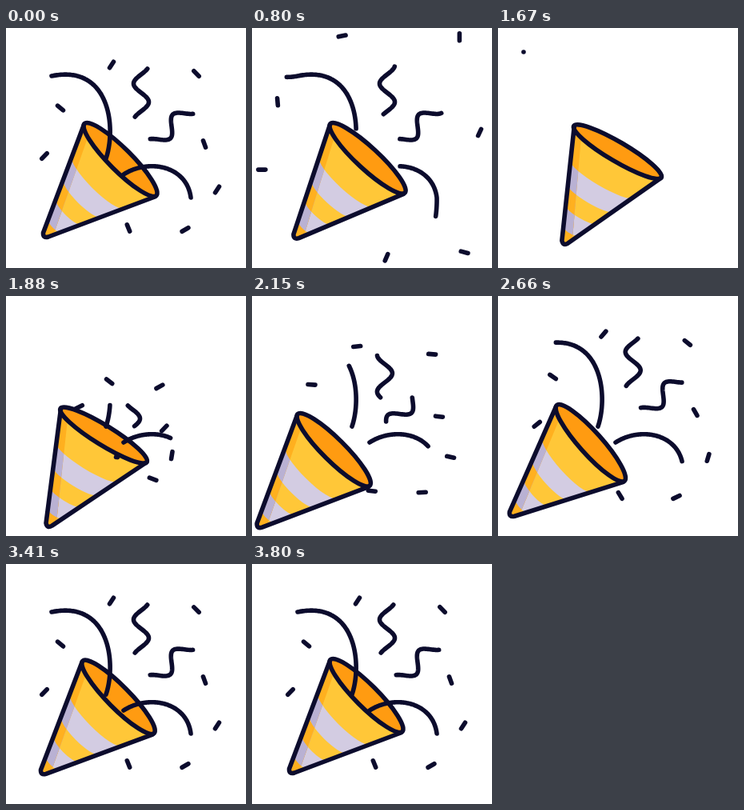
An HTML page with a canvas that plays this animation: 300x300 px, repeating every 3.83 s.

```html
<!DOCTYPE html>
<html lang="en">
<head>
<meta charset="utf-8">
<title>Party popper</title>
<style>
html, body { margin: 0; width: 100%; height: 100%; overflow: hidden; background: #fff; }
canvas { display: block; width: 100vmin; height: 100vmin; }
</style>
</head>
<body>
<canvas id="stage" width="300" height="300"></canvas>
<script>
const ctx = document.getElementById('stage').getContext('2d');
const LOOP = 3830, HOLD = 530, STEP = 30, FIRE = 1690;
const INK = '#0c0c2d', INSIDE = '#ff9b11';
const LIGHT = ['#ffc738', '#d3cce2'];
const SHADE = ['#ffb01f', '#b9b1d3'];

const clamp = (v, a = 0, b = 1) => Math.min(b, Math.max(a, v));
const span = (t, a, b) => clamp((t - a) / (b - a));
const smooth = p => p * p * (3 - 2 * p);
const rad = deg => deg * Math.PI / 180;
const bezier = (a, b, c, d, t) => {
  const n = 1 - t;
  return n * n * n * a + 3 * n * n * t * b + 3 * n * t * t * c + t * t * t * d;
};

// Quick start, long soft stop: cubic-bezier(.275, 0, .397, 1)
function settle(p) {
  let lo = 0, hi = 1;
  for (let i = 0; i < 20; i++) {
    const m = (lo + hi) / 2;
    if (bezier(0, 0.275, 0.397, 1, m) < p) lo = m; else hi = m;
  }
  return smooth(lo);
}

// Samples a curve by length; tail and head are where its visible part rests
function ribbon(curve, tail, head) {
  const N = 260, pts = [], len = [0];
  for (let i = 0; i <= N; i++) {
    pts.push(curve(i / N));
    if (i) len.push(len[i - 1] + Math.hypot(pts[i][0] - pts[i - 1][0], pts[i][1] - pts[i - 1][1]));
  }
  return { pts, len, total: len[N], tail: len[Math.round(tail * N)], head: len[Math.round(head * N)] };
}

// Two joined cubics: the first is seen at rest, the second leads away
function streamer(...p) {
  return ribbon(u => {
    const k = u < 0.5 ? 0 : 3, t = u < 0.5 ? u * 2 : u * 2 - 1;
    return [0, 1].map(c => bezier(p[k][c], p[k + 1][c], p[k + 2][c], p[k + 3][c], t));
  }, 0, 0.5);
}

// Sine wave through (x, y) heading along deg
function squiggle(x, y, deg) {
  const c = Math.cos(rad(deg)), s = Math.sin(rad(deg));
  return ribbon(u => {
    const a = 260 * u - 90, n = -9.5 * Math.sin(a * Math.PI * 2 / 46);
    return [x + a * c - n * s, y + a * s + n * c];
  }, 60 / 260, 120 / 260);
}

const left = streamer([125, 163], [138, 125], [130, 45], [57, 60], [8, 70], [-10, 20], [32, 30]);
const right = streamer([147, 183], [178, 163], [226, 172], [231, 212], [232, 250], [215, 310], [180, 350]);
const upper = squiggle(169, 81, -90);
const lower = squiggle(207, 123, -45);

// Resting place and angle of each confetti piece
const BITS = [
  [132, 46, -57], [238, 57, 45], [248, 145, 70], [264, 202, 123],
  [224, 252, -30], [153, 250, 68], [48, 160, -45], [68, 100, 40]
];

function drawRibbon(r, tail, head, dx = 0, dy = 0) {
  tail = clamp(tail, 0, r.total);
  head = clamp(head, 0, r.total);
  if (head <= 0) return;
  const at = s => {
    let i = 1;
    while (i < r.len.length - 1 && r.len[i] < s) i++;
    const u = (s - r.len[i - 1]) / (r.len[i] - r.len[i - 1]);
    return [0, 1].map(c => r.pts[i - 1][c] + (r.pts[i][c] - r.pts[i - 1][c]) * u);
  };
  ctx.save();
  ctx.translate(dx, dy);
  ctx.beginPath();
  ctx.moveTo(...at(tail));
  r.pts.forEach((p, i) => { if (r.len[i] > tail && r.len[i] < head) ctx.lineTo(...p); });
  ctx.lineTo(...at(head));
  ctx.stroke();
  ctx.restore();
}

const leave = (r, e) => drawRibbon(r, r.tail + (r.total - r.tail) * e, r.head + (r.total - r.head) * e);

function drawBit(x, y, deg) {
  const c = 4.5 * Math.cos(rad(deg)), s = 4.5 * Math.sin(rad(deg));
  ctx.beginPath();
  ctx.moveTo(x - c, y - s);
  ctx.lineTo(x + c, y + s);
  ctx.stroke();
}

function drawConfetti(t, out) {
  const near = Math.exp((FIRE - t) / 212);
  const flat = 0.9 * Math.pow(Math.max(0, (3080 - t) / 930), 2.4);
  const m = out / 0.156;
  for (const [x, y, a] of BITS) {
    if (t >= FIRE) {
      drawBit(x + (125 - x) * near, y + (195 - y) * near, a * (1 - flat));
    } else {
      // outward swirl around the middle
      const rx = x - 148, ry = y - 149;
      drawBit(x + (0.37 * rx + 0.13 * ry) * m, y + (0.37 * ry - 0.13 * rx) * m, a + 45 * m);
    }
  }
}

const TIP = [47.5, 261];

function drawCone(t) {
  let turn = -14.5 * smooth(span(t, 510, 1670));
  if (t > 1800) turn = -14.5 + 18.6 * smooth(span(t, 1800, 2310));
  if (t > 2310) turn = 4.1 * (1 - settle(span(t, 2310, 3800)));
  const push = t < 2120 ? smooth(span(t, 1610, 2030)) : 1 - settle(span(t, 2120, 3800));

  // the mouth narrows as the cone leans back
  const tilt = 0.13 * Math.min(turn, 0);
  const mouth = [143 + 0.7 * tilt, 164.5 - 0.7 * tilt], rx = 63.5, ry = 14 + tilt;

  // part of the cone from its tip up to fraction k of its height
  const band = (k, color) => {
    ctx.beginPath();
    ctx.moveTo(...TIP);
    ctx.ellipse(TIP[0] + (mouth[0] - TIP[0]) * k, TIP[1] + (mouth[1] - TIP[1]) * k,
      rx * k, ry * k, Math.PI / 4, Math.PI, 0, true);
    ctx.closePath();
    ctx.fillStyle = color;
    ctx.fill();
  };
  const stripes = colors => [1, 0.705, 0.495, 0.315, 0.13].forEach((k, i) => band(k, colors[i % 2]));

  ctx.save();
  ctx.translate(97 - 41 * push, 120 + 28 * push);
  ctx.rotate(rad(turn));
  ctx.translate(-97, -120);

  stripes(LIGHT);
  ctx.save();
  ctx.beginPath();
  ctx.moveTo(90, 110);
  ctx.lineTo(111, 112);
  ctx.lineTo(58, 262);
  ctx.lineTo(40, 264);
  ctx.clip();
  stripes(SHADE);
  ctx.restore();

  ctx.beginPath();
  ctx.ellipse(...mouth, rx, ry, Math.PI / 4, 0, Math.PI * 2);
  ctx.fillStyle = INSIDE;
  ctx.fill();
  ctx.stroke();
  ctx.beginPath();
  ctx.moveTo(97, 122);
  ctx.lineTo(46.5, 256);
  ctx.quadraticCurveTo(46, 263, 53, 261);
  ctx.lineTo(186, 211);
  ctx.stroke();
  ctx.restore();
}

function drawRibbons(t, out) {
  if (t < FIRE) {
    leave(left, out);
    leave(right, out);
    const e = smooth(span(t, 730, 1640));
    if (e < 1) [upper, lower].forEach(r => leave(r, e));
    return;
  }
  const grow = span(t, FIRE, FIRE + 300);
  const q = Math.max(0, (3080 - t) / 930);
  const u = 9 * Math.exp((FIRE - t) / 212);
  drawRibbon(left, 0, Math.min(left.head - 76 * q * q, left.head * grow));
  drawRibbon(right, 0, Math.min(right.head - 27 * q * q, right.head * grow));
  drawRibbon(upper, upper.tail - 13 * u, upper.head - 26 * u, -3 * u, 4 * u);
  drawRibbon(lower, lower.tail - 13 * u, lower.head - 36 * u, -6 * u, 8 * u);
}

function draw(t) {
  ctx.fillStyle = '#fff';
  ctx.fillRect(0, 0, 300, 300);
  ctx.strokeStyle = INK;
  ctx.lineWidth = 5.6;
  ctx.lineCap = ctx.lineJoin = 'round';
  const out = smooth(span(t, 510, 1670));
  drawConfetti(t, out);
  drawCone(t);
  drawRibbons(t, out);
}

function tick() {
  const t = performance.now() % LOOP;
  draw(t < HOLD ? 0 : HOLD + Math.floor((t - HOLD) / STEP) * STEP);
  requestAnimationFrame(tick);
}
tick();
</script>
</body>
</html>
```
